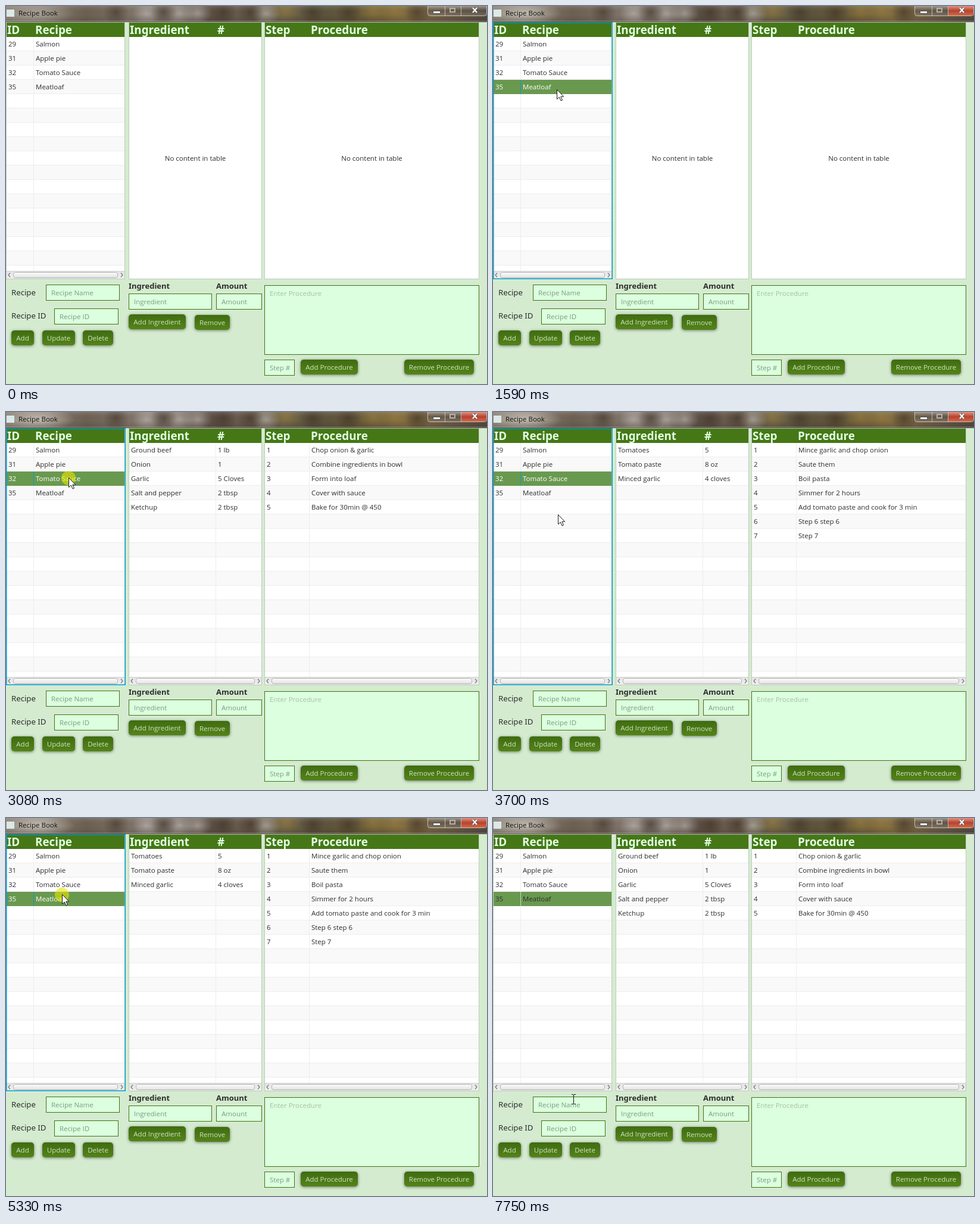
An HTML page with a canvas that plays this animation: 808x635 px, repeating every 8 s.

```html
<!DOCTYPE html>
<html lang="en">
<head>
<meta charset="utf-8">
<title>Recipe Book</title>
<style>
html, body { margin: 0; width: 100%; height: 100%; overflow: hidden; background: #d4ebd0; }
canvas { display: block; }
</style>
</head>
<body>
<canvas id="stage" width="808" height="635"></canvas>
<script>
const ctx = document.getElementById('stage').getContext('2d');
const LOOP = 8000;
const BODY = '11.5px "Open Sans", sans-serif';
const LABEL = '13.2px "Noto Sans", sans-serif';
const BOLD = 'bold 13px "Noto Sans", sans-serif';
const HEADER = 'bold 18.8px "Noto Sans", sans-serif';
const INK = '#2e2e2e', GREEN = '#457716', BLUE = '#039ed3';

const recipes = [['29', 'Salmon'], ['31', 'Apple pie'], ['32', 'Tomato Sauce'], ['35', 'Meatloaf']];
const numbered = steps => steps.map((s, i) => [i + 1, s]);
const meatloaf = {
  parts: [['Ground beef', '1 lb'], ['Onion', '1'], ['Garlic', '5 Cloves'], ['Salt and pepper', '2 tbsp'], ['Ketchup', '2 tbsp']],
  steps: numbered(['Chop onion & garlic', 'Combine ingredients in bowl', 'Form into loaf', 'Cover with sauce', 'Bake for 30min @ 450'])
};
const sauce = {
  parts: [['Tomatoes', '5'], ['Tomato paste', '8 oz'], ['Minced garlic', '4 cloves']],
  steps: numbered(['Mince garlic and chop onion', 'Saute them', 'Boil pasta', 'Simmer for 2 hours',
    'Add tomato paste and cook for 3 min', 'Step 6 step 6', 'Step 7'])
};

// Pointer way points: time, x, y
const path = [
  [580, 647, 587], [900, 235, 294], [1190, 113, 152], [1330, 107, 140], [2660, 107, 140], [2980, 105, 110],
  [3640, 105, 111], [3850, 118, 320], [4080, 124, 488], [4220, 124, 488], [4350, 124, 483], [4460, 124, 483],
  [4600, 113, 333], [4760, 91, 155], [4840, 89, 132], [4900, 94, 127], [5080, 94, 128], [5630, 94, 128],
  [5840, 124, 409], [5960, 131, 468], [6080, 133, 479], [6640, 133, 479], [6830, 135, 472]
];
const presses = [[1510, 1590], [1900, 2080], [3080, 3350], [5330, 5510], [6260, 6520]];
const caretShown = [[6330, 6830], [7340, 7750]];
const within = (t, spans) => spans.some(([a, b]) => t >= a && t < b);

function pointerAt(t) {
  if (t < path[0][0]) return null;
  const i = path.findIndex(p => p[0] > t);
  if (i < 0) return path[path.length - 1].slice(1);
  const [t0, x0, y0] = path[i - 1], [t1, x1, y1] = path[i];
  const k = (t - t0) / (t1 - t0);
  return [Math.round(x0 + (x1 - x0) * k), Math.round(y0 + (y1 - y0) * k)];
}

function box(x, y, w, h, fill) {
  ctx.fillStyle = fill;
  ctx.fillRect(x, y, w, h);
}

function frame(x, y, w, h, color, line = 1) {
  ctx.strokeStyle = color;
  ctx.lineWidth = line;
  ctx.strokeRect(x + line / 2, y + line / 2, w - line, h - line);
}

function text(s, x, y, font = BODY, color = INK) {
  ctx.font = font;
  ctx.fillStyle = color;
  ctx.fillText(s, x, y);
}

function vertical(y, h, ...colors) {
  const g = ctx.createLinearGradient(0, y, 0, y + h);
  colors.forEach((c, i) => g.addColorStop(i / (colors.length - 1), c));
  return g;
}

function rounded(x, y, w, h, r, fill, stroke) {
  ctx.beginPath();
  ctx.roundRect(x, y, w, h, r);
  ctx.fillStyle = fill;
  ctx.fill();
  if (stroke) {
    ctx.strokeStyle = stroke;
    ctx.lineWidth = 1;
    ctx.stroke();
  }
}

function polyline(points, color, width) {
  ctx.beginPath();
  points.forEach(([x, y]) => ctx.lineTo(x, y));
  ctx.strokeStyle = color;
  ctx.lineWidth = width;
  ctx.stroke();
}

function blob(x, y, rx, ry, rgb, alpha) {
  ctx.save();
  ctx.translate(x, y);
  ctx.scale(rx, ry);
  const g = ctx.createRadialGradient(0, 0, 0, 0, 0, 1);
  g.addColorStop(0, `rgba(${rgb},${alpha})`);
  g.addColorStop(1, `rgba(${rgb},0)`);
  box(-1, -1, 2, 2, g);
  ctx.restore();
}

function titleBar(active) {
  ctx.save();
  ctx.beginPath();
  ctx.rect(0, 0, 808, 27);
  ctx.clip();
  const g = ctx.createLinearGradient(0, 0, 808, 0);
  ['#8d8478', '#82776a', '#6c6051', '#7d7166', '#857b72', '#5c4f43', '#6b5f50', '#696047', '#5d543d', '#6a5c3a', '#806c42', '#6a5b45', '#544a40']
    .forEach((c, i, all) => g.addColorStop(i / (all.length - 1), c));
  box(0, 0, 808, 27, g);
  for (const x of [236, 292, 322, 437]) blob(x, 12, 24, 20, '196,190,186', .6);
  for (const x of [185, 265, 365, 410, 515, 575, 690]) blob(x, 10, 22, 24, '58,44,32', .55);
  for (const x of [470, 617, 652]) blob(x, 8, 26, 18, '166,134,62', .5);
  blob(54, 12, 62, 19, '235,230,222', active ? .65 : .4);
  box(0, 0, 808, 27, vertical(0, 27, 'rgba(255,255,255,.12)', 'rgba(0,0,0,0)', 'rgba(0,0,0,.12)'));
  box(0, 25, 808, 1, 'rgba(255,255,255,.35)');
  box(0, 26, 808, 1, 'rgba(50,45,40,.7)');
  ctx.restore();

  box(1, 6, 13, 12, '#dbe9e8');
  text('Recipe Book', 21, 16, BODY, '#111');

  rounded(708.5, -5, 99, 21.5, 4, vertical(0, 16, 'rgba(200,195,190,.55)', 'rgba(90,80,70,.4)', 'rgba(150,140,130,.45)'), 'rgba(225,220,215,.75)');
  if (active) rounded(765, -5, 42, 21, [0, 0, 4, 0], vertical(0, 16, '#dc9585', '#b9412c', '#cf6a4c'));
  for (const x of [737, 764]) box(x, 0, 1, 16, 'rgba(225,220,215,.7)');
  box(718, 9, 11, 3, '#fff');
  frame(717, 8, 13, 5, '#555');
  frame(745, 3, 10, 8, '#b5b0aa', 2);
  const cross = [[[784, 3], [791, 11]], [[791, 3], [784, 11]]];
  cross.forEach(l => polyline(l, '#555', 4));
  cross.forEach(l => polyline(l, '#fff', 2.2));
}

function scrollBar(x, w) {
  box(x + 1, 445, w - 2, 13, vertical(445, 13, '#e2e2e2', '#f0f0f0'));
  box(x + 1, 445, w - 2, 1, '#d2d2d2');
  rounded(x + 12.5, 447.5, w - 25, 9, 3, vertical(447, 10, '#fdfdfd', '#e2e2e2'), '#b2b2b2');
  for (const [cx, d] of [[x + 5, 2], [x + w - 5, -2]])
    polyline([[cx + d, 448.5], [cx - d / 2, 452], [cx + d, 455.5]], '#777', 1.2);
}

function table(x, w, split, titles, rows, { selected = -1, focused = false } = {}) {
  box(x, 27, w, 432, '#fff');
  if (rows) {
    for (let i = 0; i < 17; i++) {
      const y = 52 + i * 24, h = Math.min(24, 445 - y);
      box(x + 1, y, w - 2, h, i === selected ? '#69994f' : i % 2 ? '#f9f9f9' : '#fff');
      if (h === 24 && i !== selected) box(x + 1, y + 23, w - 2, 1, '#ededed');
      box(split, y, 1, h, i === selected ? (focused ? BLUE : '#c5d8bb') : '#ededed');
      const color = i === selected && focused ? '#fff' : INK;
      (rows[i] || []).forEach((s, c) => text(s, c ? split + 4 : x + 4, y + 16, BODY, color));
    }
    scrollBar(x, w);
  } else {
    ctx.textAlign = 'center';
    text('No content in table', x + w / 2, 260);
    ctx.textAlign = 'left';
  }
  frame(x, 27, w, 432, '#c0cbbd');
  box(x + 1, 28, w - 2, 24, GREEN);
  titles.forEach((s, c) => text(s, c ? split + 3 : x + 2, 47, HEADER, '#e2ffe2'));
  if (focused) frame(x, 27, w + 1, 432, BLUE, 1.5);
}

function field(x, y, w, h, prompt, color = '#7f9b80') {
  box(x, y, w, h, '#dbffdf');
  frame(x, y, w, h, '#427310');
  text(prompt, x + 9, y + 18, BODY, color);
}

function button(x, y, w, label) {
  ctx.shadowColor = 'rgba(0,0,0,.5)';
  ctx.shadowBlur = 5;
  ctx.shadowOffsetY = 1;
  rounded(x, y, w, 25, 5, vertical(y, 25, '#3f6c11', '#548319'));
  ctx.shadowColor = 'transparent';
  ctx.textAlign = 'center';
  text(label, x + w / 2, y + 17, BODY, '#cfe3c3');
  ctx.textAlign = 'left';
}

function form() {
  text('Recipe', 9, 486, LABEL);
  text('Recipe ID', 9, 525, LABEL);
  text('Ingredient', 206, 475, BOLD);
  text('Amount', 353, 475, BOLD);
  field(67, 468, 124, 27, 'Recipe Name');
  field(81, 508, 108, 27, 'Recipe ID');
  field(206, 483, 140, 27, 'Ingredient');
  field(353, 483, 77, 27, 'Amount');
  field(434, 469, 361, 117, 'Enter Procedure', '#a9bfa9');
  field(434, 594, 51, 27, 'Step #');
  button(9, 545, 38, 'Add');
  button(61, 545, 55, 'Update');
  button(129, 545, 51, 'Delete');
  button(206, 518, 96, 'Add Ingredient');
  button(317, 519, 59, 'Remove');
  button(495, 594, 96, 'Add Procedure');
  button(669, 594, 117, 'Remove Procedure');
}

function pointer(x, y, pressed) {
  if (pressed) {
    ctx.beginPath();
    ctx.arc(x, y + 1, 12, 0, 7);
    ctx.fillStyle = 'rgba(230,230,0,.6)';
    ctx.fill();
  }
  if (y >= 468) {
    box(x, y - 7, 1, 15, '#111');
    for (const edge of [y - 8, y + 8]) {
      box(x - 3, edge, 3, 1, '#111');
      box(x + 1, edge, 3, 1, '#111');
    }
    return;
  }
  ctx.save();
  ctx.translate(x + .5, y + .5);
  const arrow = new Path2D('M0 0V16L3.8 12.6 6.6 18.6 9 17.5 6.3 11.7H11.2Z');
  ctx.fillStyle = '#fff';
  ctx.fill(arrow);
  ctx.strokeStyle = '#1a1a24';
  ctx.lineWidth = 1;
  ctx.stroke(arrow);
  ctx.restore();
}

function draw(t) {
  const active = t >= 1510;
  const selected = !active ? -1 : t >= 3080 && t < 5330 ? 2 : 3;
  const shown = t < 2000 ? {} : t >= 3350 && t < 5510 ? sauce : meatloaf;

  box(0, 0, 808, 635, '#d4ebd0');
  titleBar(active);
  table(0, 200, 46, ['ID', 'Recipe'], recipes, { selected, focused: active && t < 6330 });
  table(206, 224, 352, ['Ingredient', '#'], shown.parts);
  table(434, 361, 509, ['Step', 'Procedure'], shown.steps);
  form();
  if (within(t, caretShown)) box(75, 473, 1, 17, '#333');
  const at = pointerAt(t);
  if (at) pointer(...at, within(t, presses));
}

const start = performance.now();
function tick() {
  draw((performance.now() - start) % LOOP);
  requestAnimationFrame(tick);
}
tick();
</script>
</body>
</html>
```
